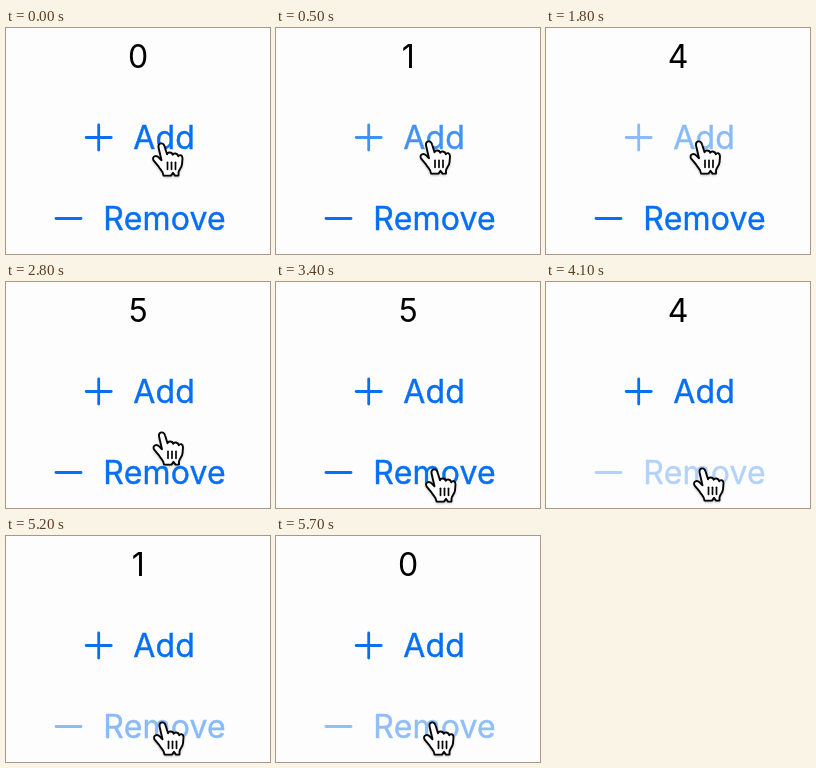
Animation, 264 px wide and 226 px high, one loop 5.8 s. Source, as an HTML page with a canvas:

```html
<!DOCTYPE html>
<html lang="en">
<head>
<meta charset="utf-8">
<title>Counter</title>
<style>
html, body { margin: 0; width: 100%; height: 100%; overflow: hidden; background: #fdfdfd; }
canvas { display: block; width: 264px; height: 226px; }
</style>
</head>
<body>
<canvas id="stage" width="264" height="226"></canvas>
<script>
const W = 264, H = 226, LOOP = 5800, STEP = 100;
const BLUE = [6, 111, 244], PAPER = 253;
const FONT = '32px Inter, Roboto, "Liberation Sans", sans-serif';
const canvas = document.getElementById('stage');
const ctx = canvas.getContext('2d');
const dpr = window.devicePixelRatio || 1;
canvas.width = W * dpr;
canvas.height = H * dpr;

// Release time of each tap
const adds = [310, 800, 1270, 1730, 2150];
const removes = [3600, 4110, 4620, 5130, 5640];
const FADE = 290;

// time, x, y of the fingertip
const path = [
  [0, 155.5, 115.3], [300, 153, 113.3], [2450, 153, 113.3], [2800, 156, 150.3],
  [3050, 158, 181], [3300, 158.5, 187.3], [3450, 158.5, 187.3], [3600, 156.5, 186.3], [LOOP, 156.5, 186.3]
];

const hand = new Path2D(
  'M-3 4C-3.5-.8 1.8-1.3 3 3L5.5 11C6 8.5 10.5 8.5 11.2 11.5' +
  'C12 9.5 16 9.5 16.8 13C18 11 21 11.5 21 15L20.5 21C20 25 17.5 26 17 29' +
  'V32.3H13.5L11.5 29.5L9.5 32.3H2C2 28-1 27-3 23L-8 17C-10 13-5 11-2 15L0 17Z'
);

const mix = (a, b, k) => a + (b - a) * k;
const done = (taps, t) => taps.filter(r => r <= t).length;

// Dims quickly on press, recovers after release
function opacity(taps, t) {
  let a = 1;
  for (const r of taps) {
    if (t >= r - 90 && t < r) a = 0.3;
    else if (t >= r && t < r + FADE) a = Math.min(a, mix(0.3, 1, (t - r) / FADE));
  }
  return a;
}

function pointerAt(t) {
  let i = 1;
  while (i < path.length - 1 && t > path[i][0]) i++;
  const [t0, x0, y0] = path[i - 1], [t1, x1, y1] = path[i];
  const k = (t - t0) / (t1 - t0);
  return [mix(x0, x1, k), mix(y0, y1, k)];
}

function line(x0, y0, x1, y1) {
  ctx.beginPath();
  ctx.moveTo(x0, y0);
  ctx.lineTo(x1, y1);
  ctx.stroke();
}

function button(label, textX, baseline, iconX, iconY, plus, alpha) {
  const tint = BLUE.map(c => Math.round(mix(PAPER, c, alpha)));
  ctx.fillStyle = ctx.strokeStyle = `rgb(${tint})`;
  ctx.lineCap = ctx.lineJoin = 'round';
  ctx.textAlign = 'left';
  ctx.fillText(label, textX, baseline);
  // A hairline gives the letters a little more weight
  ctx.lineWidth = 0.4;
  ctx.strokeText(label, textX, baseline);
  ctx.lineWidth = 2.8;
  line(iconX - 12.5, iconY, iconX + 12.5, iconY);
  if (plus) line(iconX, iconY - 12.5, iconX, iconY + 12.5);
}

function pointer(x, y) {
  ctx.save();
  ctx.translate(x, y);
  ctx.lineJoin = ctx.lineCap = 'round';
  ctx.shadowColor = 'rgba(0,0,0,.4)';
  ctx.shadowBlur = 3 * dpr;
  ctx.shadowOffsetY = 1.5 * dpr;
  ctx.fillStyle = '#fff';
  ctx.fill(hand);
  ctx.shadowColor = 'transparent';
  ctx.strokeStyle = '#050505';
  ctx.lineWidth = 1.9;
  ctx.stroke(hand);
  ctx.lineWidth = 1.7;
  for (let i = 0; i < 3; i++) line(6 + i * 4, 19, 6 + i * 4, 26);
  ctx.restore();
}

function draw(t) {
  ctx.setTransform(dpr, 0, 0, dpr, 0, 0);
  ctx.fillStyle = `rgb(${PAPER},${PAPER},${PAPER})`;
  ctx.fillRect(0, 0, W, H);
  ctx.font = FONT;
  ctx.textBaseline = 'alphabetic';
  ctx.textAlign = 'center';
  ctx.fillStyle = '#000';
  ctx.letterSpacing = '0px';
  ctx.fillText(done(adds, t) - done(removes, t), 132.2, 40);
  ctx.letterSpacing = '0.2px';
  button('Add', 127.2, 121, 92.7, 109.5, true, opacity(adds, t));
  button('Remove', 97.3, 202, 62.5, 190.5, false, opacity(removes, t));
  pointer(...pointerAt(t));
}

const start = performance.now();
function tick() {
  const t = (performance.now() - start) % LOOP;
  draw(Math.floor(t / STEP) * STEP);
  requestAnimationFrame(tick);
}
tick();
</script>
</body>
</html>
```
